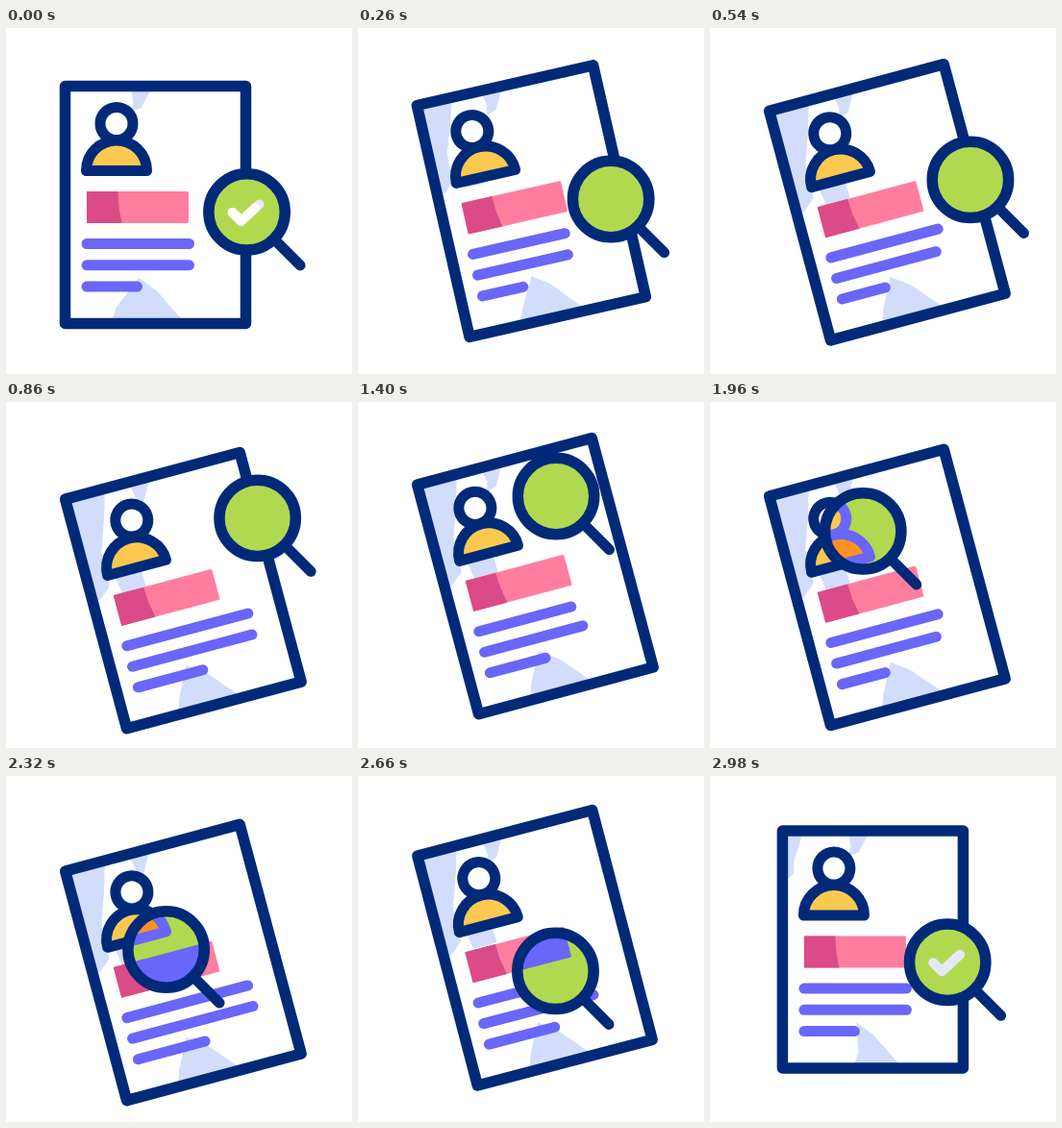
Recreate the animation shown at these times as an HTML page with a canvas. Size 360 by 360 pixels, loop 3 s.

```html
<!DOCTYPE html>
<html lang="en">
<head>
<meta charset="utf-8">
<title>Profile check</title>
<style>
html, body { margin: 0; width: 100%; height: 100%; overflow: hidden; background: #fff; }
canvas { display: block; width: 360px; height: 360px; }
</style>
</head>
<body>
<canvas id="c"></canvas>
<script>
const LOOP = 3000;
const NAVY = '#002a78', VIOLET = '#6966fa', GREEN = '#b1d950', PALE = '#d2ddfb';
const PAGE = { line: NAVY, face: '#fff', body: '#fbc950', bar: '#ff7e9f', shade: '#da4b88' };
const LENS = { line: VIOLET, face: '#fbc950', body: '#ff9122', bar: VIOLET, shade: VIOLET };
const W = 188, H = 247;

// Time and angle in degrees of the glass on its round trip.
const ORBIT = [[0, -50.5], [540, -8], [860, 34], [1400, 98], [1960, 162.3], [2320, 214.5], [LOOP, 308]];

const canvas = document.getElementById('c');
const ctx = canvas.getContext('2d');
const dpr = window.devicePixelRatio || 1;
canvas.width = canvas.height = 360 * dpr;

const rad = deg => deg * Math.PI / 180;
const clamp = v => Math.min(1, Math.max(0, v));
const mix = (a, b, u) => a + (b - a) * u;
const ramp = (t, from, to) => (1 - Math.cos(Math.PI * clamp((t - from) / (to - from)))) / 2;
const wave = (t, peak, period) => Math.cos(2 * Math.PI * (t - peak) / period);

// 0 while the page stands upright, 1 while it floats.
const lift = t => ramp(t, 20, 340) - ramp(t, 2630, 2940);
// Drifts from first to last over the loop, and takes the floating value when lifted.
const settle = (t, first, last, floating) => mix(mix(first, last, t / LOOP), floating, lift(t));

// Smooth curve through key points.
function spline(keys, t) {
  let i = 0;
  while (i < keys.length - 2 && t >= keys[i + 1][0]) i++;
  const a = keys[i], b = keys[i + 1];
  const p = keys[i - 1] || a, n = keys[i + 2] || b;
  const d = b[0] - a[0], u = (t - a[0]) / d;
  const ma = (b[1] - p[1]) / (b[0] - p[0]) * d;
  const mb = (n[1] - a[1]) / (n[0] - a[0]) * d;
  const s = u * u * (3 - 2 * u);
  return mix(a[1], b[1], s) + u * (1 - u) * ((1 - u) * ma - u * mb);
}

function trace(pts) {
  ctx.beginPath();
  pts.forEach(([x, y]) => ctx.lineTo(x, y));
}

function fill(color) {
  ctx.fillStyle = color;
  ctx.fill();
}

function poly(pts, color) {
  trace(pts);
  ctx.closePath();
  fill(color);
}

function stroke(color, width = 11) {
  ctx.strokeStyle = color;
  ctx.lineWidth = width;
  ctx.stroke();
}

function placePage(t) {
  const bob = 187.7 - 10 * wave(t, 375, 1185);
  ctx.translate(settle(t, 155.5, 169.5, 184.4), settle(t, 184, 180.5, bob));
  ctx.rotate(-rad(15 * lift(t)));
}

function drawPatches(t) {
  const size = settle(t, 0, 0.42, 1);
  ctx.save();
  ctx.translate(-89, -118);
  ctx.scale(size, size);
  poly([[0, 0], [36, 0], [29, 24], [17, 58], [16, 94], [3, 105], [0, 105]], PALE);
  if (size > 0.6) poly([[24, 85], [52, 85], [53, 104], [27, 104]], PALE);
  ctx.restore();
  poly([[-25, -119], [-5, -119], [-15, -101], [-26, -97], [-23, -107]], PALE);
  const foot = settle(t, -45, -19, -37);
  poly([[foot, 119], [foot + 4, 107], [-17, 76], [1, 89], [27, 119]], PALE);
}

function drawContent(t, c) {
  ctx.beginPath();
  ctx.roundRect(-71.5, -14, 106, 33, 1.5);
  fill(c.bar);
  poly([[-71.5, -14], [-39, -14], [-38, 3], [-35, 19], [-71.5, 19]], c.shade);

  const sway = lift(t) * (1.8 + 6 * wave(t, 910, 1420));
  ctx.beginPath();
  ctx.arc(-40.5 + sway, -84.5, 17, 0, 7);
  fill(c.face);
  stroke(c.line);

  ctx.beginPath();
  ctx.arc(-40.5, -35.5, 31.5, Math.PI, 0);
  ctx.closePath();
  fill(c.body);
  stroke(c.line);
}

function drawLines(t) {
  for (let i = 0; i < 3; i++) {
    const y = 40.5 + 22.3 * i;
    const stretch = lift(t) * (6 + 18 * wave(t, 860 + 100 * i, 1420));
    trace([[-71.5, y], [(i < 2 ? 35 : -19) + stretch, y]]);
    stroke(VIOLET);
  }
}

function drawPage(t) {
  ctx.save();
  placePage(t);
  drawPatches(t);
  drawContent(t, PAGE);
  drawLines(t);
  ctx.beginPath();
  ctx.rect(-W / 2, -H / 2, W, H);
  stroke(NAVY, 11.5);
  ctx.restore();
}

function drawTick(t) {
  const leaving = 1 - t / 260;
  const shown = clamp(Math.max(leaving, (t - 2700) / 200));
  if (!shown) return;
  trace([[-15, 0.5], [-6, 9.5], [13, -8]]);
  ctx.setLineDash([38.6 * shown, 100]);
  stroke('#e3e9f8', 10);
  if (leaving > 0) {
    ctx.setLineDash([33 * shown, 100]);
    stroke('#fff', 10);
  }
  ctx.setLineDash([]);
}

function drawGlass(t) {
  const angle = rad(spline(ORBIT, t));
  const x = 214 + 57.5 * Math.cos(angle), y = 150.5 - 53 * Math.sin(angle);
  ctx.save();
  ctx.beginPath();
  ctx.arc(x, y, 40, 0, 7);
  fill(GREEN);
  ctx.clip();
  placePage(t);
  drawContent(t, LENS);
  ctx.restore();

  ctx.save();
  ctx.translate(x, y);
  drawTick(t);
  trace([[29, 29], [55.5, 55.5]]);
  stroke(NAVY);
  ctx.beginPath();
  ctx.arc(0, 0, 39.7, 0, 7);
  stroke(NAVY, 11.5);
  ctx.restore();
}

let start;
function frame(now) {
  start ??= now;
  const t = (now - start) % LOOP;
  ctx.setTransform(dpr, 0, 0, dpr, 0, 0);
  ctx.fillStyle = '#fff';
  ctx.fillRect(0, 0, 360, 360);
  ctx.lineCap = ctx.lineJoin = 'round';
  drawPage(t);
  drawGlass(t);
  requestAnimationFrame(frame);
}
requestAnimationFrame(frame);
</script>
</body>
</html>
```
